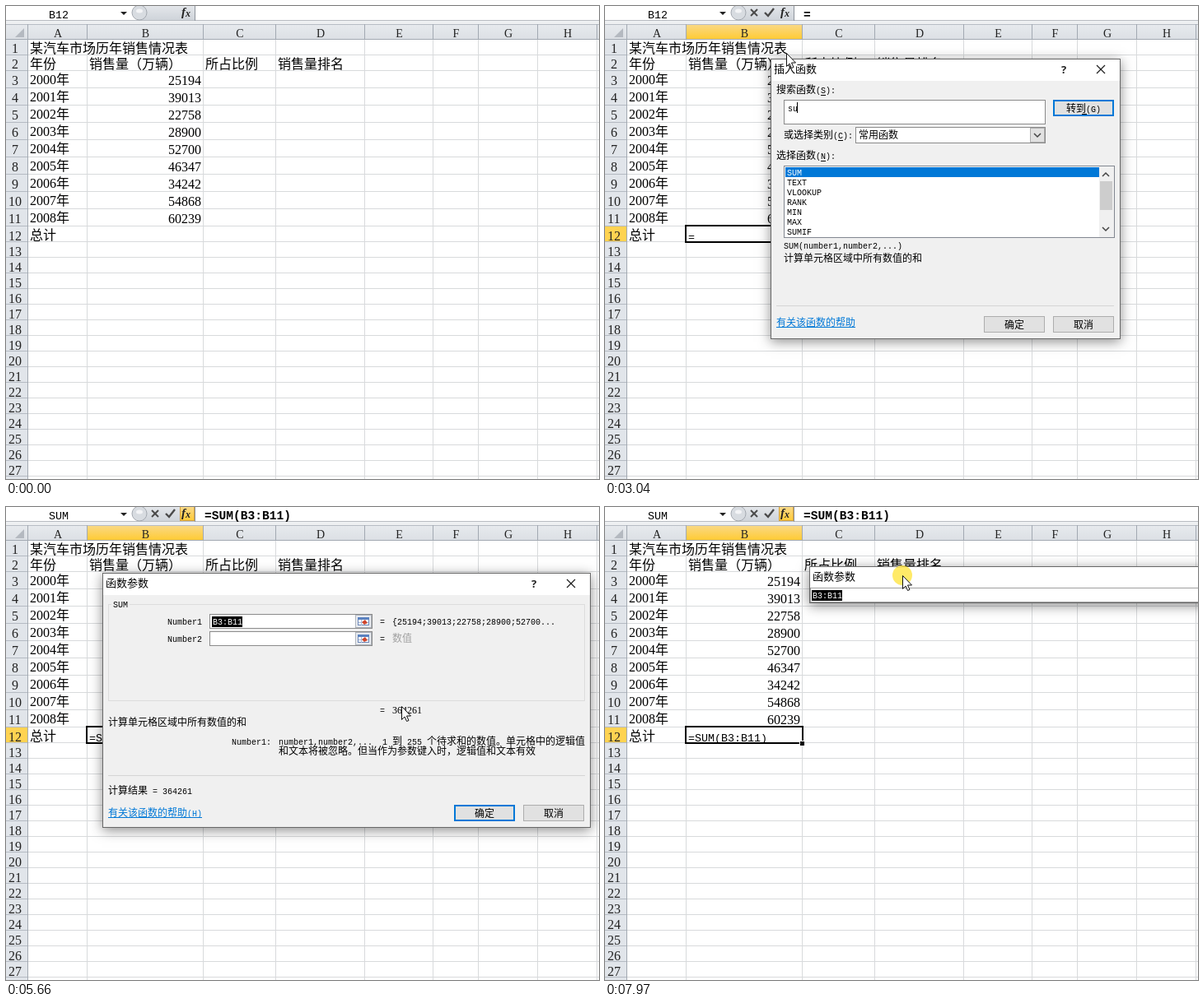
Animation, 720 px wide and 575 px high, one loop 7990 ms. Source, as an HTML page with a canvas:

```html
<!DOCTYPE html>
<html lang="zh-CN">
<head>
<meta charset="utf-8">
<style>
html, body { margin: 0; width: 100%; height: 100%; overflow: hidden; background: #fff; }
canvas { display: block; width: 720px; height: 575px; }
</style>
</head>
<body>
<canvas id="stage" width="720" height="575"></canvas>
<script>
const ctx = document.getElementById('stage').getContext('2d', { alpha: false });
const LOOP = 7990;
const CJK = '"Noto Sans CJK SC", "Noto Sans CJK", sans-serif';
const MONO = '"Liberation Mono", monospace';
const SERIF = '"Liberation Serif", serif';
const BLUE = '#0078d7';
const FORMULA = '=SUM(B3:B11)';
const SUM_HELP = '计算单元格区域中所有数值的和';
const PROMPT = '请输入一条简短说明来描述您想做什么，然后单击“转到”';

const columns = [26, 98, 239, 327, 435, 518, 573, 645, 717];
const sales = [25194, 39013, 22758, 28900, 52700, 46347, 34242, 54868, 60239];
const rowBottom = r => r < 3 ? 40 + 19 * r : r < 12 ? 78 + 21 * (r - 2) : 267 + 19 * (r - 11);
const rowText = r => rowBottom(r) - (r < 3 ? 8 : r < 12 ? 9 : 7);

// Pointer keys: time, x, y
const path = [
  [80, 635, 558], [600, 211, 274], [1100, 211, 274], [1560, 216, 10], [1900, 216, 10],
  [2180, 223, 40], [2350, 220, 57], [3520, 220, 57], [3800, 470, 170], [4020, 578, 133],
  [4220, 490, 376], [5240, 490, 376], [5660, 480, 242], [6030, 430, 133], [6640, 430, 133],
  [6980, 230, 91], [7080, 230, 91], [7350, 321, 87], [7430, 345, 85], [7790, 358, 83],
  [7930, 358, 83], [7970, 361, 83]
];
const clicks = [[740, 910], [1700, 1850], [4430, 4590], [6050, 6200], [7020, LOOP]];

const clamp = v => Math.max(0, Math.min(1, v));
const opening = (t, start) => 1 - (1 - clamp((t - start) / 300)) ** 5;

function slope(i, k) {
  const a = path[i - 1], b = path[i], c = path[i + 1];
  if (!a || !c) return 0;
  const still = (p, q) => p[1] === q[1] && p[2] === q[2];
  return still(a, b) || still(b, c) ? 0 : (c[k] - a[k]) / (c[0] - a[0]);
}

function pointerAt(t) {
  const last = path.length - 1;
  if (t >= path[last][0]) return path[last].slice(1);
  let i = 0;
  while (path[i + 1][0] <= t) i++;
  const a = path[i], b = path[i + 1], d = b[0] - a[0], u = clamp((t - a[0]) / d);
  return [1, 2].map(k =>
    a[k] + (b[k] - a[k]) * u * u * (3 - 2 * u) +
    d * slope(i, k) * u * (1 - u) ** 2 - d * slope(i + 1, k) * u * u * (1 - u));
}

function box(x, y, w, h, fill) {
  ctx.fillStyle = fill;
  ctx.fillRect(x, y, w, h);
}

function frame(x, y, w, h, fill, line, width = 1) {
  box(x, y, w, h, line);
  box(x + width, y + width, w - 2 * width, h - 2 * width, fill);
}

function stroke(points, color, width = 1) {
  ctx.beginPath();
  points.forEach(([x, y]) => ctx.lineTo(x, y));
  ctx.strokeStyle = color;
  ctx.lineWidth = width;
  ctx.stroke();
}

function poly(points, fill, line) {
  ctx.beginPath();
  points.forEach(([x, y]) => ctx.lineTo(x, y));
  ctx.closePath();
  ctx.fillStyle = fill;
  ctx.fill();
  if (line) {
    ctx.strokeStyle = line;
    ctx.lineWidth = 1;
    ctx.stroke();
  }
}

// Half-width Latin, full-width Chinese; y is the vertical middle
function text(str, x, y, size = 12, { color = '#000', align = 0, weight = '', underline = false } = {}) {
  const runs = str.match(/[\x20-\x7e]+|[^\x20-\x7e]+/g).map(s => {
    const face = s.charCodeAt(0) > 126 ? size + 'px ' + CJK
      : /^\d+$/.test(s) ? size + 'px ' + SERIF
      : size * 5 / 6 + 'px ' + MONO;
    const font = weight + ' ' + face;
    ctx.font = font;
    return { s, font, w: ctx.measureText(s).width };
  });
  const total = runs.reduce((sum, r) => sum + r.w, 0);
  const left = Math.round(x - total * align), base = Math.round(y + size * .36);
  let at = left;
  ctx.fillStyle = color;
  for (const r of runs) {
    ctx.font = r.font;
    ctx.fillText(r.s, at, base);
    at += r.w;
  }
  if (underline) box(left, base + 1, total, 1, color);
  return left + total;
}

function keyLabel(str, key, x, y) {
  const end = text(`${str}(${key}):`, x, y);
  box(end - 18, y + 6, 6, 1, '#000');
}

function chevron(x, y, dir) {
  stroke([[x - 4, y - 2 * dir], [x, y + 2 * dir], [x + 4, y - 2 * dir]], '#444', 1.5);
}

function button(label, x, y, state) {
  const line = state ? BLUE : '#adadad';
  frame(x, y, 74, 20, state === 'hover' ? '#e5f1fb' : '#e1e1e1', line, state === 'default' ? 2 : 1);
  text(label, x + 37, y + 11, 12, { align: .5 });
}

function goldFill(y, h) {
  const g = ctx.createLinearGradient(0, y, 0, y + h);
  g.addColorStop(0, '#f9d988');
  g.addColorStop(1, '#ffcb35');
  return g;
}

function drawBar(t) {
  const editing = t >= 1640, filled = t >= 4900;
  box(0, 0, 720, 17, '#fff');
  box(0, 17, 720, 1, '#b8bcc2');
  box(0, 18, 720, 4, '#eef0f2');
  const g = ctx.createLinearGradient(0, 0, 0, 17);
  g.addColorStop(0, '#e3e6ea');
  g.addColorStop(1, '#cfd4da');
  box(160, 0, 69, 17, g);
  ctx.beginPath();
  ctx.arc(162, 8, 9, 0, 7);
  ctx.fillStyle = '#d8dce1';
  ctx.fill();
  ctx.strokeStyle = '#a4a9b0';
  ctx.lineWidth = 1;
  ctx.stroke();
  ctx.beginPath();
  ctx.ellipse(162, 6, 4, 2.5, 0, 0, 7);
  ctx.fillStyle = '#f3f4f6';
  ctx.fill();
  box(229, 0, 1, 18, '#8f959d');
  text(filled ? 'SUM' : 'B12', 64, 9, 16, { align: .5 });
  poly([[139, 7], [147, 7], [143, 11]], '#222');
  if (filled || (t >= 1540 && t < 1880)) frame(211, -1, 18, 18, goldFill(0, 17), '#d5a13b');
  ctx.fillStyle = '#222';
  ctx.font = 'italic bold 15px ' + SERIF;
  ctx.fillText('f', 213, 12);
  ctx.font = 'italic bold 12px ' + SERIF;
  ctx.fillText('x', 218, 13);
  if (editing) {
    stroke([[177, 4], [185, 12]], '#4a4a4a', 2);
    stroke([[185, 4], [177, 12]], '#4a4a4a', 2);
    stroke([[194, 8], [198, 12], [205, 3]], '#4a4a4a', 2.4);
  }
  if (t >= 1700) text(filled ? FORMULA : '=', 241, 9, 17.5, { weight: 'bold' });
}

function drawSheet(t) {
  const picked = t >= 800;
  box(0, 0, 720, 575, '#fff');
  for (let r = 1; r < 28; r++) box(27, rowBottom(r), 693, 1, '#d8dadc');
  columns.slice(1).forEach(x => box(x, 41, 1, 534, '#d8dadc'));

  const g = ctx.createLinearGradient(0, 22, 0, 40);
  g.addColorStop(0, '#e7eaee');
  g.addColorStop(1, '#dce0e5');
  box(0, 22, 720, 18, g);
  box(0, 41, 26, 534, '#e1e5ea');
  if (picked) {
    box(98, 22, 141, 18, goldFill(22, 18));
    box(0, 268, 26, 18, '#ffd351');
  }
  box(0, 22, 720, 1, '#b7bcc4');
  box(0, 40, 720, 1, '#a2a9b2');
  box(26, 22, 1, 553, '#a2a9b2');
  poly([[22, 27], [22, 38], [11, 38]], '#b4b9c0');
  columns.slice(1).forEach((x, i) => {
    box(x, 22, 1, 18, '#a2a9b2');
    ctx.font = '14px ' + SERIF;
    ctx.fillStyle = '#222';
    ctx.textAlign = 'center';
    ctx.fillText('ABCDEFGH'[i], (columns[i] + x) / 2 + 1, 38);
    ctx.textAlign = 'left';
  });
  for (let r = 1; r < 28; r++) {
    box(0, rowBottom(r), 26, 1, '#b4bac2');
    text(String(r), 10.5, rowText(r), 16, { align: .5, color: '#222' });
  }

  box(28, 42, 194, 16, '#fff');
  text('某汽车市场历年销售情况表', 29, rowText(1), 16);
  ['年份', '销售量（万辆）', '所占比例', '销售量排名'].forEach((s, i) =>
    text(s, [29, 101, 242, 330][i], rowText(2), 16));
  sales.forEach((n, i) => {
    text(2000 + i + '年', 29, rowText(i + 3) - 1, 16);
    text(String(n), 237, rowText(i + 3), 16, { align: 1 });
  });
  text('总计', 29, rowText(12) - 1, 16);

  if (picked) {
    ctx.strokeStyle = '#000';
    ctx.lineWidth = 2;
    ctx.strokeRect(98, 267, 142, 20);
    box(236, 284, 6, 6, '#fff');
    box(237, 285, 5, 5, '#000');
  }
  if (t >= 1700) text(t >= 4900 ? FORMULA : '=', 101, 279, 16);
}

function windowFrame(title, x, y, w, h) {
  ctx.save();
  ctx.shadowColor = 'rgba(0,0,0,.45)';
  ctx.shadowBlur = 14;
  ctx.shadowOffsetY = 3;
  box(x, y, w, h, '#686868');
  ctx.restore();
  box(x + 1, y + 1, w - 2, h - 2, '#f0f0f0');
  box(x + 1, y + 1, w - 2, 26, '#fff');
  text(title, x + 4, y + 12, 13);
  ctx.font = 'bold 13px "Open Sans", sans-serif';
  ctx.fillStyle = '#222';
  ctx.fillText('?', x + w - 72, y + 18);
  const cx = x + w - 24, cy = y + 13;
  stroke([[cx - 5, cy - 5], [cx + 5, cy + 5]], '#222', 1.2);
  stroke([[cx + 5, cy - 5], [cx - 5, cy + 5]], '#222', 1.2);
}

// Scale and fade about the window centre
function fading(p, cx, cy, draw) {
  if (p <= 0) return;
  const s = .9 + .1 * p;
  ctx.save();
  ctx.globalAlpha = p;
  ctx.translate(cx, cy);
  ctx.scale(s, s);
  ctx.translate(-cx, -cy);
  draw();
  ctx.restore();
}

function insertDialog(t) {
  windowFrame('插入函数', 201, 64, 425, 341);
  keyLabel('搜索函数', 'S', 208, 102);
  frame(217, 114, 318, 30, '#fff', '#8a8a8a');
  if (t < 2990) {
    box(221, 117, 312, 14, '#000');
    text(PROMPT, 221, 124, 12, { color: '#fff' });
  } else {
    const typed = 'sum'.slice(0, t < 3040 ? 1 : t < 3180 ? 2 : 3);
    const end = text(typed, 222, 124);
    box(Math.round(end) - 1, 117, 1, 13, '#000');
  }
  button('转到(G)', 544, 114, t >= 3960 && t < 4070 ? 'hover' : t < 4190 ? 'default' : '');
  box(579, 131, 6, 1, '#000');

  keyLabel('或选择类别', 'C', 217, 157);
  frame(304, 147, 231, 20, '#fff', '#8a8a8a');
  frame(516, 148, 18, 18, '#e1e1e1', '#adadad');
  chevron(525, 157, 1);
  text('常用函数', 308, 157);

  keyLabel('选择函数', 'N', 208, 182);
  frame(217, 194, 402, 88, '#fff', '#828790');
  box(219, 196, 381, 12, BLUE);
  ['SUM', 'TEXT', 'VLOOKUP', 'RANK', 'MIN', 'MAX', 'SUMIF'].forEach((s, i) =>
    text(s, 221, 202 + 12 * i, 12, { color: i ? '#000' : '#fff' }));
  box(600, 195, 18, 86, '#f0f0f0');
  box(601, 213, 15, 35, '#cdcdcd');
  chevron(608, 205, -1);
  chevron(608, 271, 1);

  text('SUM(number1,number2,...)', 217, 291);
  text(SUM_HELP, 217, 307);
  box(208, 364, 410, 1, '#d5d5d5');
  text('有关该函数的帮助', 208, 385, 12, { color: BLUE, underline: true });
  button('确定', 460, 377, t >= 4190 ? 'hover' : '');
  button('取消', 544, 377, '');
}

function pickerIcon(x, y) {
  frame(x, y, 20, 16, '#e8ebf0', '#b0b5bd');
  frame(x + 3, y + 3, 14, 10, '#fff', '#6b86b5');
  box(x + 3, y + 3, 14, 3, '#5b82c0');
  box(x + 7, y + 6, 1, 7, '#a9bcdb');
  box(x + 4, y + 9, 12, 1, '#a9bcdb');
  poly([[x + 8, y + 9], [x + 12, y + 6], [x + 15, y + 10], [x + 11, y + 12]], '#d0452b');
}

function selectedRange(x, y) {
  box(x, y - 6, 37, 13, '#000');
  text('B3:B11', x + 1, y, 12, { color: '#fff' });
}

function argsDialog() {
  windowFrame('函数参数', 117, 80, 593, 310);
  ctx.strokeStyle = '#dcdcdc';
  ctx.lineWidth = 1;
  ctx.strokeRect(124.5, 118.5, 578, 117);
  box(128, 113, 22, 12, '#f0f0f0');
  text('SUM', 130, 118);
  [139, 160].forEach((y, i) => {
    text('Number' + (i + 1), 196, y);
    frame(247, y - 9, 198, 18, '#fff', '#8a8a8a');
    pickerIcon(424, y - 8);
    text('=', 454, y);
  });
  selectedRange(250, 139);
  text('{25194;39013;22758;28900;52700...', 469, 139);
  text('数值', 469, 160, 12, { color: '#a0a0a0' });
  text('=', 454, 247);
  text('364261', 469, 247);
  text(SUM_HELP, 124, 262);
  text('Number1:', 274, 285);
  text('number1,number2,...  1 到 255 个待求和的数值。单元格中的逻辑值', 331, 285);
  text('和文本将被忽略。但当作为参数键入时，逻辑值和文本有效', 331, 297);
  box(124, 326, 579, 1, '#d5d5d5');
  text('计算结果 = 364261', 124, 345);
  text('有关该函数的帮助(H)', 124, 372, 12, { color: BLUE, underline: true });
  button('确定', 544, 362, 'default');
  button('取消', 628, 362, '');
}

function collapsedDialog(x, y) {
  windowFrame('函数参数', x, y, 593, 45);
  frame(x + 1, y + 26, 591, 18, '#fff', '#a0a0a0');
  pickerIcon(x + 571, y + 27);
  selectedRange(x + 3, y + 35);
}

function drawPointer(t, x, y) {
  if (t < 80) return;
  if (clicks.some(([from, to]) => t >= from && t < to)) {
    ctx.beginPath();
    ctx.arc(x, y, 12, 0, 7);
    ctx.fillStyle = 'rgba(255,225,40,.7)';
    ctx.fill();
  }
  const at = pts => pts.map(([a, b]) => [x + a, y + b]);
  if (t < 1560 && y > 40) {
    poly(at([[-3, -8], [3, -8], [3, -3], [8, -3], [8, 3], [3, 3],
      [3, 8], [-3, 8], [-3, 3], [-8, 3], [-8, -3], [-3, -3]]), '#fff', '#222');
  } else {
    poly(at([[.5, .5], [.5, 16.5], [4, 13], [6.5, 18.5], [9, 17.5], [6.5, 12], [11.5, 12]]), '#fff', '#111');
  }
}

function draw(t) {
  const [x, y] = pointerAt(t).map(Math.round);
  drawSheet(t);
  drawBar(t);
  if (t < 4770) {
    const p = t < 4620 ? opening(t, 2040) : 1 - (t - 4620) / 150;
    fading(p, 413, 234, () => insertDialog(t));
  } else if (t < 6220) {
    fading(opening(t, 5160), 413, 235, argsDialog);
  } else {
    const held = t >= 7080;
    collapsedDialog(held ? x - 113 : 117, held ? y - 11 : 80);
  }
  drawPointer(t, x, y);
}

function tick() {
  draw(performance.now() % LOOP);
  requestAnimationFrame(tick);
}
tick();
</script>
</body>
</html>
```
